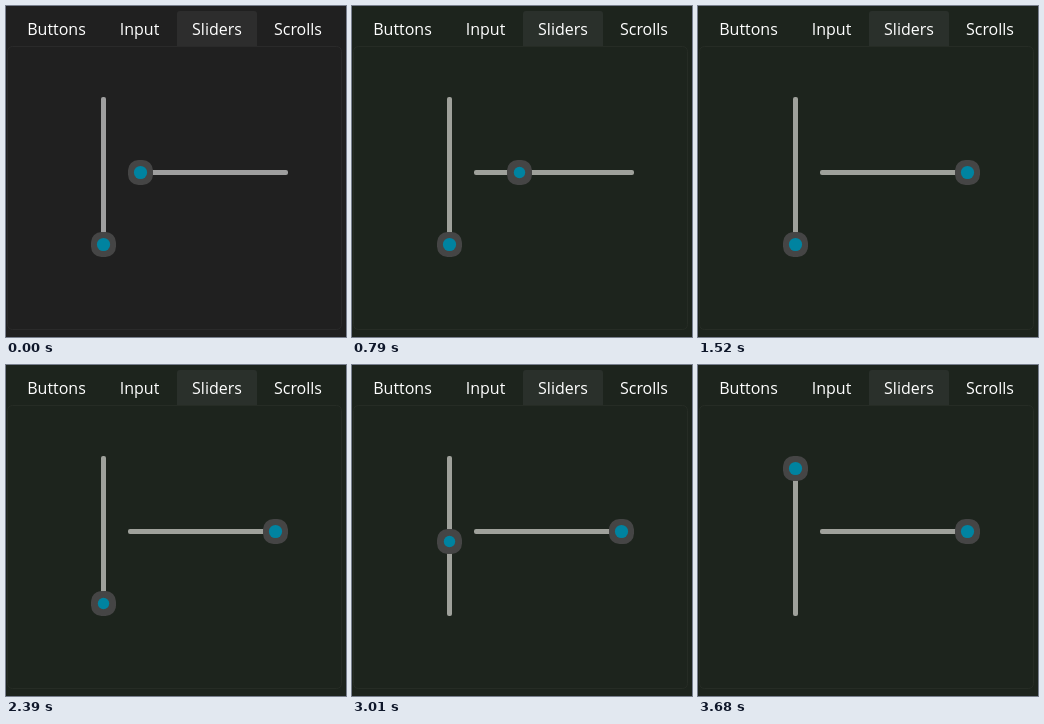
An HTML page for the animation above (3.78 s loop, 340 by 331 pixels).

```html
<!DOCTYPE html>
<html lang="en">
<head>
<meta charset="utf-8">
<title>Sliders</title>
<style>
  html, body { margin: 0; width: 100%; height: 100%; overflow: hidden; }
  svg { display: block; width: 340px; height: 331px;
    --bg: #202020; --tab: #2d2d2d; --line: #2a2a2a; --track: #9f9f9f; }
  svg.tinted { --bg: #1d241d; --tab: #2a302b; --line: #262c25; --track: #9fa19b; }
  .bg { fill: var(--bg); }
  .tab { fill: var(--tab); }
  .panel { fill: none; stroke: var(--line); }
  .track { fill: var(--track); }
  .thumb rect { fill: #454545; }
  .thumb circle { fill: #0083a0; }
  text { font: 16px "Open Sans", "Noto Sans", sans-serif; fill: #fff; text-anchor: middle; }
</style>
</head>
<body>
<svg id="stage" viewBox="0 0 340 331">
  <rect class="bg" width="340" height="331"/>
  <path class="tab" d="M171 40V8q0-3 3-3h74q3 0 3 3v32z"/>
  <rect class="panel" x="1.5" y="40.5" width="334" height="283" rx="5"/>
  <text x="50.5" y="29">Buttons</text>
  <text x="133.5" y="29">Input</text>
  <text x="211" y="29">Sliders</text>
  <text x="292" y="29">Scrolls</text>
  <rect class="track" x="95" y="91" width="5" height="160" rx="2"/>
  <rect class="track" x="122" y="164" width="160" height="5" rx="2"/>
  <g class="thumb" id="vertical"><rect x="-12.5" y="-12.5" width="25" height="25" rx="10.5"/><circle/></g>
  <g class="thumb" id="horizontal"><rect x="-12.5" y="-12.5" width="25" height="25" rx="10.5"/><circle/></g>
</svg>
<script>
const LOOP = 3780, TRAVEL = 135;
const stage = document.getElementById('stage');
const vertical = document.getElementById('vertical');
const horizontal = document.getElementById('horizontal');

const clamp = v => Math.min(1, Math.max(0, v));
const between = (t, a, b) => t >= a && t < b;
const smooth = p => p * p * (3 - 2 * p);
// Hold time between pointer updates
const stepped = (t, start, size) => start + Math.floor((t - start) / size) * size;

function place(thumb, x, y, pressed, color) {
  const dot = thumb.lastElementChild;
  thumb.setAttribute('transform', `translate(${x} ${y})`);
  dot.setAttribute('r', pressed ? 5.7 : 6.6);
  dot.style.fill = color;
}

function draw(t) {
  stage.classList.toggle('tinted', t >= 560);

  const right = t < 725 ? 0 : smooth(clamp((stepped(t, 725, 32) - 645) / 444));
  place(horizontal, 134.5 + Math.round(right * TRAVEL), 166.5,
    between(t, 100, 1520), '#0083a0');

  const up = clamp((stepped(t, 2687.2, 38.57) - 2690) / 520) ** 1.457;
  place(vertical, 97.5, 238.5 - Math.round(up * TRAVEL),
    between(t, 2390, 3680), between(t, 2690, 3010) ? '#3b7d89' : '#0083a0');
}

const start = performance.now();
function frame() {
  draw((performance.now() - start) % LOOP);
  requestAnimationFrame(frame);
}
frame();
</script>
</body>
</html>
```
